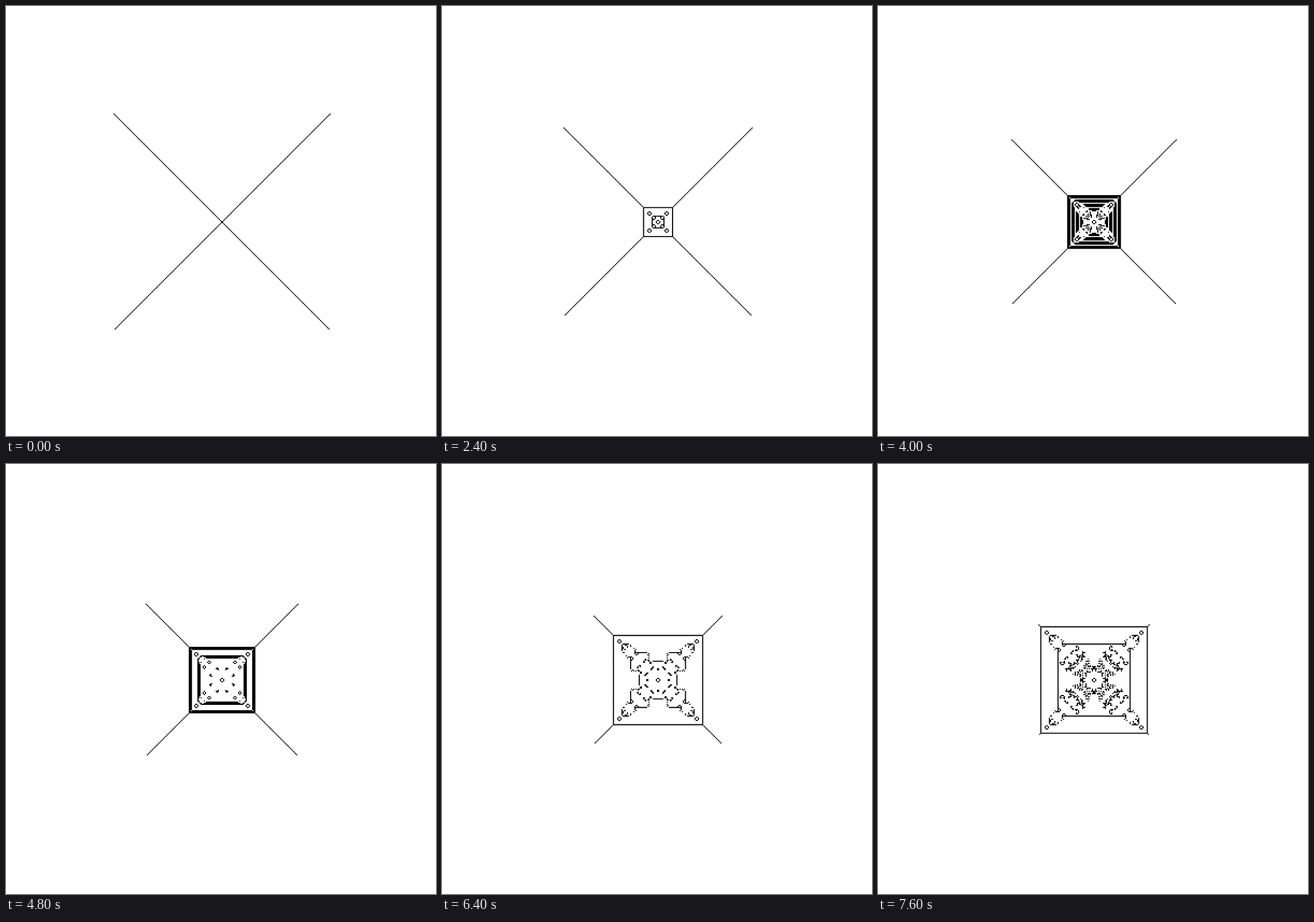
These frames come from a looping animation (748 px wide and 748 px high, 8000 ms). An HTML page with a canvas:

```html
<!DOCTYPE html>
<html lang="en">
<head>
<meta charset="utf-8">
<title>Life: crossing diagonals</title>
<style>
html, body { margin: 0; width: 100%; height: 100%; overflow: hidden; background: #fff; }
canvas { display: block; }
</style>
</head>
<body>
<canvas width="748" height="748"></canvas>
<script>
const SIZE = 400, CELL = 1.87, STEP = 400, STEPS = 20;
const ctx = document.querySelector('canvas').getContext('2d');

// Two diagonals of 201 cells whose crossing forms a 2x2 block
function seed() {
  const grid = new Uint8Array(SIZE * SIZE);
  for (let i = 100; i <= 300; i++) {
    grid[i * SIZE + i] = 1;
    grid[i * SIZE + 401 - i] = 1;
  }
  return grid;
}

// Conway's rule: birth on 3 neighbours, survival on 2 or 3
function evolve(grid) {
  const next = new Uint8Array(grid.length);
  for (let y = 1; y < SIZE - 1; y++) {
    for (let x = 1; x < SIZE - 1; x++) {
      const i = y * SIZE + x, up = i - SIZE, down = i + SIZE;
      const n = grid[up - 1] + grid[up] + grid[up + 1] + grid[i - 1] + grid[i + 1]
        + grid[down - 1] + grid[down] + grid[down + 1];
      next[i] = n === 3 || (n === 2 && grid[i]) ? 1 : 0;
    }
  }
  return next;
}

function outline(grid) {
  const path = new Path2D();
  grid.forEach((alive, i) => {
    if (alive) path.rect(i % SIZE, Math.floor(i / SIZE), 1, 1);
  });
  return path;
}

// Slow start, then about 2.76 generations per step
const generation = k => Math.max(k, Math.floor(2.76 * k - 2.86));

const paths = [];
let grid = seed(), age = 0;
for (let k = 0; k < STEPS; k++) {
  for (; age < generation(k); age++) grid = evolve(grid);
  paths.push(outline(grid));
}

ctx.scale(CELL, CELL);
const start = performance.now();
let shown = -1;

function draw(now) {
  const k = Math.floor(Math.max(0, now - start) / STEP) % STEPS;
  if (k !== shown) {
    ctx.clearRect(0, 0, SIZE, SIZE);
    ctx.fill(paths[k]);
    shown = k;
  }
  requestAnimationFrame(draw);
}
draw(start);
</script>
</body>
</html>
```
